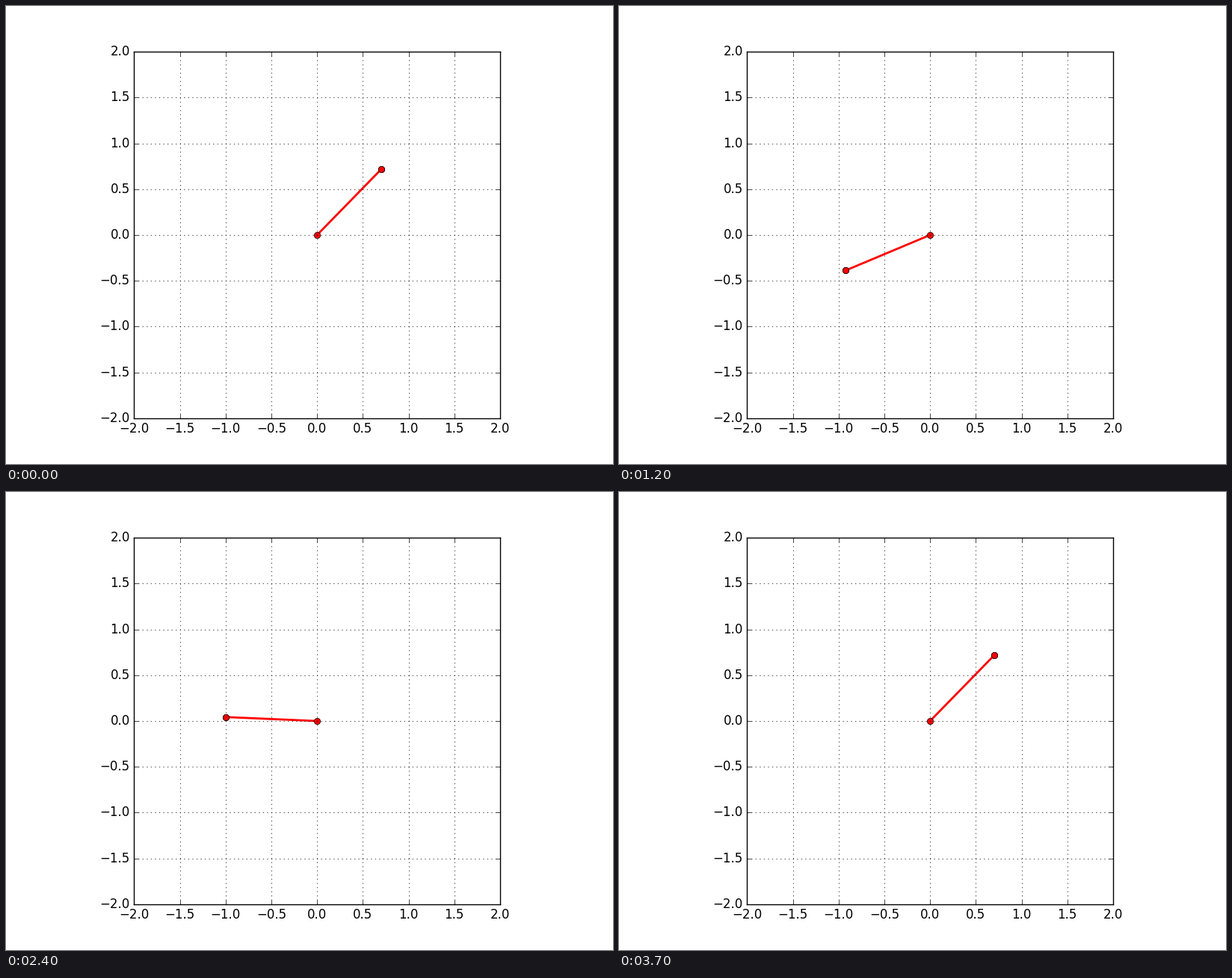
Recreate the animation shown at these times as a matplotlib script. Size 812x612 px, loop 3.72 s.

```python
import numpy as np
import matplotlib.pyplot as plt
from matplotlib.animation import FuncAnimation

plt.style.use("classic")
plt.rcParams["font.family"] = "DejaVu Sans"

W, H, DPI = 812, 612, 100
FRAMES, INTERVAL = 186, 20

GRAVITY = 9.81
LENGTH = 1.0
DT = 1 / 60            # simulated seconds per frame
AMPLITUDE = np.radians(135.7)
LEAD = 0.7 * DT        # the loop starts just before the turning point


def derivative(state):
    angle, speed = state
    return np.array([speed, -GRAVITY / LENGTH * np.sin(angle)])


def rk4(state, dt):
    k1 = derivative(state)
    k2 = derivative(state + dt / 2 * k1)
    k3 = derivative(state + dt / 2 * k2)
    k4 = derivative(state + dt * k3)
    return state + dt / 6 * (k1 + 2 * k2 + 2 * k3 + k4)


def swing():
    """Angle from the downward vertical for every frame of one loop."""
    state = rk4(np.array([AMPLITUDE, 0.0]), -LEAD)
    angles = []
    for _ in range(FRAMES):
        angles.append(state[0])
        state = rk4(state, DT)
    return np.array(angles)


angles = swing()

# The tiny margin keeps the pixel width from being truncated.
fig = plt.figure(figsize=(W / DPI + 1e-9, H / DPI + 1e-9), dpi=DPI,
                 facecolor="white")
ax = fig.add_subplot(111, aspect="equal", autoscale_on=False,
                     xlim=(-2, 2), ylim=(-2, 2))
ax.grid()

rod, = ax.plot([], [], "ro-", lw=2)
bob, = ax.plot([], [], "ro")


def update(i):
    x = LENGTH * np.sin(angles[i])
    y = -LENGTH * np.cos(angles[i])
    rod.set_data([0, x], [0, y])
    bob.set_data([x], [y])
    return rod, bob


anim = FuncAnimation(fig, update, frames=FRAMES, interval=INTERVAL,
                     repeat=True, repeat_delay=0, blit=False)
plt.show()
```
